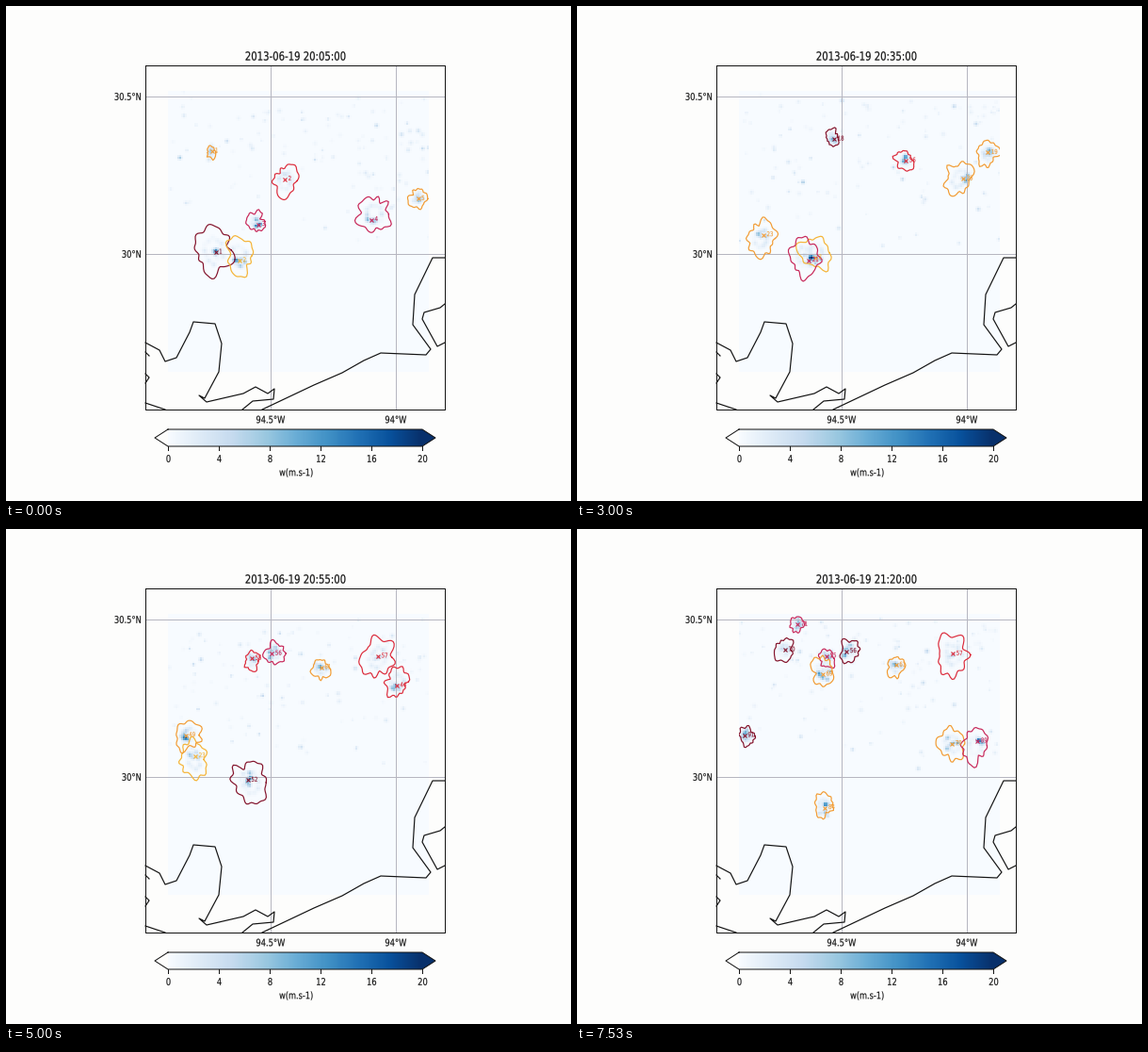
Recreate the animation shown at these times as a matplotlib script. Size 600 by 525 pixels, loop 8 s.

```python
import numpy as np
import matplotlib.pyplot as plt
from matplotlib.animation import FuncAnimation
from matplotlib.patches import PathPatch, Polygon, Rectangle
from matplotlib.textpath import TextPath
from matplotlib.transforms import Affine2D

W, H = 600, 525
PX = 0.72                      # points per pixel at 100 dpi
ASPECT = 167 / 133             # degree of latitude over degree of longitude
X0, X1, Y0, Y1 = 172, 449, 90, 388
STEPS = 16
DRIFT = np.array([0.8, -0.5])  # steering wind, pixels per step

INK = '#141414'
GRID = '#b6b6c0'
COLORS = dict(Y='#f5b436', O='#f29c34', R='#dc2c3c', C='#c8285a', K='#84142c')

fig = plt.figure(figsize=(W / 100, H / 100), dpi=100, facecolor='#fdfdfc')
ax = fig.add_axes([0, 0, 1, 1])
ax.axis('off')


def line(pts, color=INK, width=1.0, **kw):
    x, y = np.asarray(pts, float).reshape(-1, 2).T
    return ax.plot(x, y, color=color, lw=width * PX, **kw)[0]


def label(x, y, s, size, color=INK, align=0.5):
    """Text in the map's own aspect, centred vertically on y."""
    path = TextPath((0, 0), s, size=size)
    box = path.get_extents()
    shift = Affine2D().translate(-box.x0 - align * box.width, -0.365 * size)
    place = shift.scale(1, -ASPECT).translate(x, y)
    return ax.add_patch(PathPatch(place.transform_path(path), fc=color, ec=color,
                                  lw=0.02 * size * PX, zorder=6))


# ---- map -----------------------------------------------------------------
gx, gy = np.meshgrid(np.arange(X0 + 1, X1, 2), np.arange(Y0 + 1, Y1, 2))
field = ax.imshow(np.zeros(gx.shape), cmap='Blues', vmin=0, vmax=20, aspect='auto',
                  extent=(X0, X1, Y1, Y0), interpolation='nearest', zorder=1)
domain = ax.add_patch(Rectangle((X0, Y0), X1 - X0, Y1 - Y0, fc='none', ec='none'))

for y, name in ((96, '30.5°N'), (263, '30°N')):
    line([148, y, 466, y], GRID, zorder=2)
    label(143, y, name, 8.33, align=1)
for x, name in ((281, '94.5°W'), (414, '94°W')):
    line([x, 63, x, 428], GRID, zorder=2)
    label(x, 438.5, name, 8.33)

bay = [148, 357, 163, 365, 169, 377, 181, 373, 195, 346, 199, 335, 222, 337, 229, 358,
       226, 388, 211, 416, 205, 413, 213, 420, 252, 411, 265, 404, 278, 411, 285, 406,
       284, 417, 262, 419, 251, 428]
gulf = [272, 428, 327, 402, 357, 389, 380, 376, 398, 368, 446, 370, 451, 364, 432, 338,
        434, 306, 453, 267, 466, 267]
lake = [466, 316, 461, 320, 444, 325, 442, 332, 458, 361, 466, 357]
islets = [[148, 367, 152, 371], [148, 390, 152, 394, 148, 400], [148, 421, 169, 428]]
for coast in [bay, gulf, lake, *islets]:
    line(coast, width=1.2, zorder=3)
line([148, 63, 466, 63, 466, 428, 148, 428, 148, 63], zorder=5)

# ---- colour bar ----------------------------------------------------------
ax.imshow(np.linspace(0, 20, 256)[None], cmap='Blues', aspect='auto',
          extent=(172, 442, 467, 449), zorder=1)
ax.add_patch(Polygon([(442, 449), (456, 458), (442, 467)], fc='#08306b', lw=0))
line([172, 449, 442, 449, 456, 458, 442, 467, 172, 467, 158, 458, 172, 449], zorder=5)
for v in range(0, 21, 4):
    x = 172 + 13.5 * v
    line([x, 467, x, 471], zorder=5)
    label(x + 0.5, 480, str(v), 8.33)
label(308, 494.5, 'w(m.s-1)', 8.2)

ax.set_xlim(0, W)
ax.set_ylim(H, 0)
ax.autoscale(False)

# ---- storms --------------------------------------------------------------
# first step, last step, colours over its life, x, y at mid-life, radius
STORMS = [
    (0, 4, 'K', 222, 258, 20), (0, 7, 'Y', 251, 263, 15), (3, 7, 'C', 241, 267, 16),
    (8, 11, 'OK', 259, 269, 18), (3, 11, 'OY', 197, 246, 15), (3, 5, 'O', 200, 220, 9),
    (7, 12, 'CO', 193, 219, 13), (0, 2, 'O', 219, 155, 5), (0, 2, 'R', 298, 185, 13),
    (0, 2, 'C', 266, 228, 9), (0, 5, 'C', 392, 220, 16), (0, 2, 'O', 438, 204, 9),
    (2, 7, 'K', 270, 140, 7), (3, 8, 'O', 405, 183, 14), (3, 9, 'OK', 436, 156, 11),
    (7, 13, 'R', 415, 162, 12), (9, 15, 'R', 396, 135, 17), (11, 15, 'O', 396, 229, 14),
    (14, 15, 'C', 422, 230, 14), (5, 8, 'RO', 348, 164, 9), (9, 15, 'OYO', 336, 148, 9),
    (9, 15, 'RC', 263, 139, 8), (9, 15, 'CK', 287, 131, 10), (11, 15, 'O', 259, 152, 12),
    (11, 15, 'OK', 218, 130, 10), (11, 15, 'OC', 232, 102, 7), (13, 15, 'O', 261, 293, 10),
    (14, 15, 'K', 180, 220, 8),
]


def outline(center, radius, n, rng):
    """Ragged ring whose lobes turn a little with every step."""
    a = np.linspace(0, 2 * np.pi, int(14 + 3 * radius))
    r = np.ones_like(a)
    for k in range(2, 13):
        phase = rng.uniform(0, 2 * np.pi) + 0.4 * n
        r += 0.33 / k ** 0.8 * rng.uniform(0.3, 1) * np.cos(k * a + phase)
    r = radius * np.clip(r, 0.4, 1.7)
    return np.c_[r * np.cos(a), 1.2 * r * np.sin(a)] + center


live = []


def bump(w, x, y, peak, size):
    w += peak * np.exp(-((gx - x) ** 2 + (gy - y) ** 2) / (2 * size ** 2))


def draw_storm(w, i, n):
    first, last, hues, x, y, radius = STORMS[i]
    rng = np.random.default_rng(i)
    age = n - (first + last) / 2
    center = np.array([x, y]) + DRIFT * age
    ring = outline(center, radius, n, rng)
    mark = center + rng.uniform(-0.35, 0.35, 2) * radius

    core = rng.uniform(3, 12)
    for px, py in rng.normal(mark, 2.8, (7, 2)):
        bump(w, px, py, core * rng.uniform(0.2, 0.8), 1.5)
    for p in ring[::6]:
        bump(w, *(p + center) / 2, rng.uniform(0.5, 2.5), 1.8)

    hue = COLORS[hues[(n - first) * len(hues) // (last - first + 1)]]
    edge = line(ring, hue, 1.2, zorder=4)
    edge.set_clip_path(domain)
    cross = line(mark, hue, marker='x', ms=4.6 * PX, mew=1.1 * PX, zorder=5)
    tag = label(mark[0] + 4, mark[1] - 1, str(6 * first + i % 7 + 1), 5.4, hue, align=0)
    live.extend([edge, cross, tag])


def update(n):
    while live:
        live.pop().remove()
    rng = np.random.default_rng(100 + n)
    w = np.zeros(gx.shape)
    for _ in range(110):
        bump(w, rng.uniform(X0, X1), rng.triangular(Y0, 110, 270),
             0.5 + rng.exponential(1.2), rng.uniform(0.9, 1.6))
    for i, storm in enumerate(STORMS):
        if storm[0] <= n <= storm[1]:
            draw_storm(w, i, n)
    field.set_data(w)

    hour, minute = divmod(20 * 60 + 5 + 5 * n, 60)
    live.append(label(307.5, 53, f'2013-06-19 {hour}:{minute:02d}:00', 10.1))
    return live


anim = FuncAnimation(fig, update, frames=STEPS, interval=500, repeat=True,
                     repeat_delay=0, blit=False)
plt.show()
```
